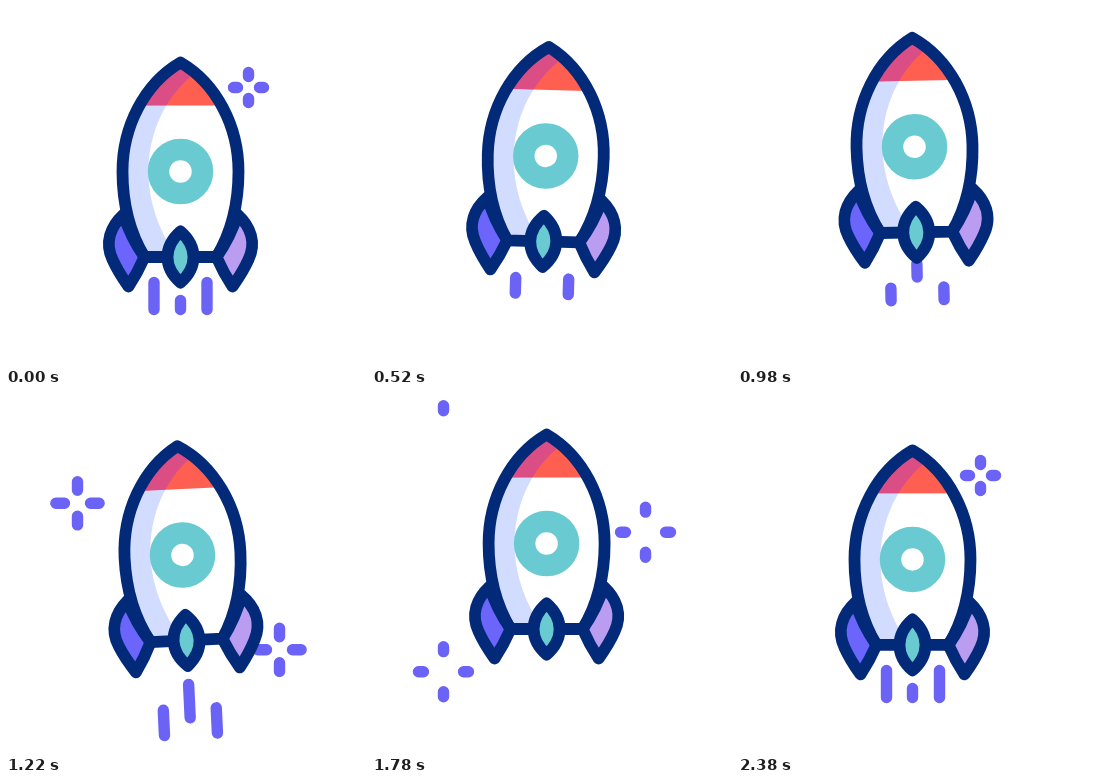
Write an HTML page that moves like this. It is 360 px wide and 360 px high and loops after 2400 ms.

```html
<!DOCTYPE html>
<html lang="en">
<head>
<meta charset="utf-8">
<title>Rocket</title>
<style>
html, body { margin: 0; width: 100%; height: 100%; overflow: hidden; background: #fff; }
svg { display: block; width: 100vw; height: 100vh; }
.trail { fill: none; stroke: #6b63f5; stroke-width: 11.4; stroke-linecap: round; }
.line { stroke: #022a78; stroke-width: 11.8; stroke-linecap: round; stroke-linejoin: round; }
</style>
</head>
<body>
<svg viewBox="0 0 360 360">
  <defs>
    <path id="body" d="M0-109C-36-88-58-45-58 0C-58 34-49 64-36 85.5H36C49 64 58 34 58 0C58-45 36-88 0-109Z"/>
    <path id="fin" d="M-57 43C-70 55-76 71-68 88C-64 97-57 108-52 115C-46 106-41 97-36 85.5C-46 71-53 56-57 43Z"/>
    <clipPath id="hull"><use href="#body"/></clipPath>
    <clipPath id="shade">
      <path d="M31-109C-9-88-32-45-32 0C-32 34-19 64-3 85.5H-70V-120Z"/>
    </clipPath>
  </defs>
  <path id="stars" class="trail"/>
  <path id="restTrail" class="trail"/>
  <g id="rocket">
    <path id="trail" class="trail"/>
    <g clip-path="url(#hull)">
      <rect x="-65" y="-115" width="130" height="205" fill="#fff"/>
      <rect x="-65" y="-115" width="130" height="49" fill="#ff5f50"/>
      <g clip-path="url(#shade)">
        <rect x="-65" y="-66" width="130" height="156" fill="#d2dcff"/>
        <rect x="-65" y="-115" width="130" height="49" fill="#db4d85"/>
      </g>
    </g>
    <circle r="22" fill="#fff" stroke="#69cbd1" stroke-width="21.5"/>
    <g class="line">
      <use href="#fin" fill="#6b65fb"/>
      <use href="#fin" fill="#ba9df0" transform="scale(-1 1)"/>
      <use href="#body" fill="none"/>
      <path fill="#69cbd1" d="M0 60C8 67 13 76 13 85.5S8 104 0 111C-8 104-13 95-13 85.5S-8 67 0 60Z"/>
    </g>
  </g>
</svg>
<script>
const LOOP = 2400;
const el = id => document.getElementById(id);

const part = (t, t0, t1) => Math.min(1, Math.max(0, (t - t0) / (t1 - t0)));
const ramp = (t, t0, t1, a, b) => a + (b - a) * part(t, t0, t1);
const out = (u, power) => 1 - (1 - u) ** power;
const ease = (t, t0, t1) => {
  const u = part(t, t0, t1);
  return u * u * (3 - 2 * u);
};

// The flight is a sum of eased moves: crouch, launch, drop, climb, settle.
function pose(t) {
  const crouch = ease(t, 0, 320), settle = ease(t, 1980, LOOP);
  return {
    dx: -1.5 * crouch + 3.5 * ease(t, 360, 900) - 4 * ease(t, 1540, 2040) + 2 * settle,
    dy: -2.5 * crouch - 35.5 * ease(t, 340, 780) + 33.5 * ease(t, 800, 1220)
      - 12.5 * ease(t, 1220, 1900) + 17 * settle,
    tilt: 1.7 * ease(t, 340, 540) - 4.4 * ease(t, 620, 1220) + 2.7 * ease(t, 1220, 1540)
  };
}

const streak = (x, top, end) => end - top > 0.05 ? `M${x} ${top}V${end}` : "";
const pair = (x, top, end) => streak(x - 26.5, top, end) + streak(x + 26.5, top, end);

function star(x, y, a, b) {
  if (b - a < 0.05) return "";
  return `M${x - a} ${y}H${x - b}M${x + a} ${y}H${x + b}M${x} ${y - a}V${y - b}M${x} ${y + a}V${y + b}`;
}

// Both ends of a streak start together; the tail slows, then catches up.
function flow(t, draw, from, tail, head, tailPower, headPower) {
  const u = part(t, 890, 1540);
  const top = from + (tail - from) * out(u, tailPower);
  const end = from + (head - from) * out(u, headPower);
  return draw(0, ramp(t, 1540, 1680, top, head), end);
}

function trailPath(t) {
  if (t < 800) {
    return pair(0, ramp(t, 360, 740, 111, 138), 138) + streak(0, ramp(t, 40, 350, 129, 138), 138);
  }
  return flow(t, pair, 135, 165.5, 185.5, 1.4, 3) + flow(t, streak, 112, 146.5, 176.5, 1, 2.2);
}

function restPath(t) {
  return pair(175, 276.5, ramp(t, 1880, 2080, 276.5, 303.5))
    + streak(174.5, 294.5, ramp(t, 2010, 2200, 294.5, 303.5));
}

function starPath(t, dx, dy) {
  if (t < 800) return star(242.5 + dx, 81.5 + dy, ramp(t, 40, 350, 11, 15), 15);
  if (t > 2050) return star(242.5, 81.5, 11, ramp(t, 2100, 2300, 11, 15));
  const y = 109.5 - (t - 1220) * 0.21;
  const a = ramp(t, 1640, 1880, 13, 25), b = 13 + 12 * out(part(t, 1010, 1540), 2.5);
  return [0, 1, 2].map(i => star(i % 2 ? 273.5 : 71.5, y + 143 * i + (i % 2) * 3.5, a, b)).join("");
}

function draw(t) {
  const { dx, dy, tilt } = pose(t);
  el("rocket").setAttribute("transform", `translate(${174.5 + dx} ${165.5 + dy}) rotate(${tilt})`);
  el("trail").setAttribute("d", trailPath(t));
  el("restTrail").setAttribute("d", restPath(t));
  el("stars").setAttribute("d", starPath(t, dx, dy));
}

const start = performance.now();
function tick(now) {
  draw(Math.max(0, now - start) % LOOP);
  requestAnimationFrame(tick);
}
draw(0);
requestAnimationFrame(tick);
</script>
</body>
</html>
```
